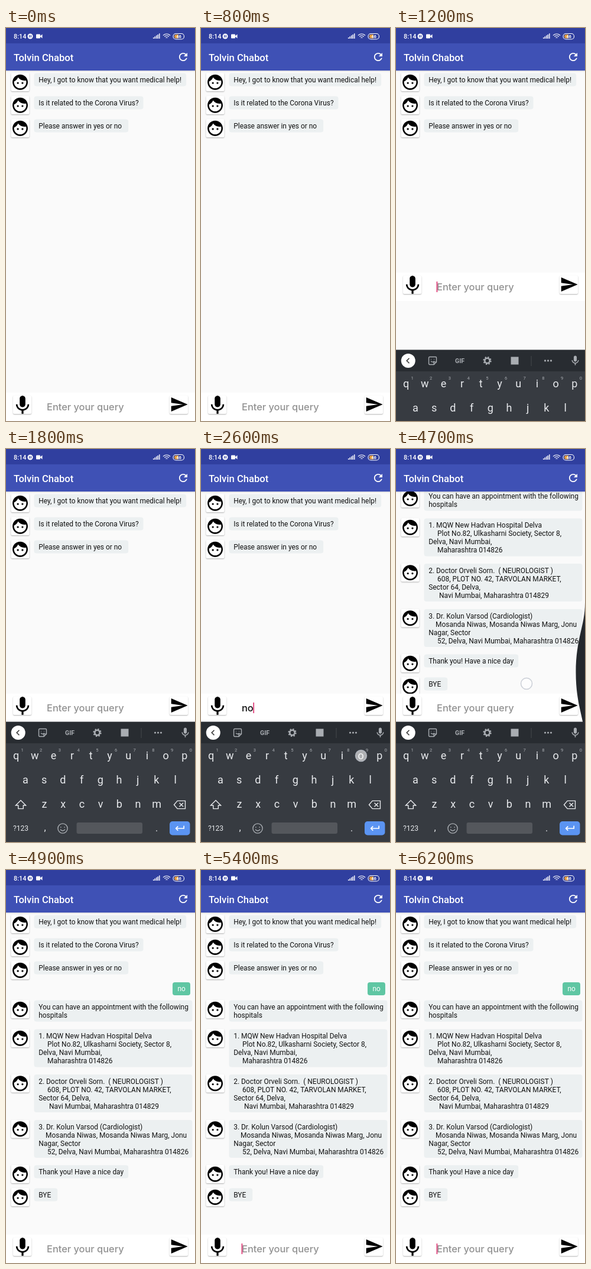
Animation, 320 px wide and 665 px high, one loop 6.3 s. Source, as an HTML page with a canvas:

```html
<!DOCTYPE html>
<html lang="en">
<head>
<meta charset="utf-8">
<title>Chat bot</title>
<style>
  html, body { margin: 0; width: 320px; height: 665px; overflow: hidden; background: #fafafa; }
  canvas { display: block; width: 320px; height: 665px; }
</style>
</head>
<body>
<canvas id="stage"></canvas>
<script>
const LOOP = 6300, W = 320, H = 665, LINE = 14;
const KEYS_UP = 1100, TYPE_N = 2300, TYPE_O = 2550, SENT = 3150, REPLY = 3850, KEYS_DOWN = 4760;
const ROBOTO = 'Roboto, sans-serif';

const canvas = document.getElementById('stage');
const scale = window.devicePixelRatio || 1;
canvas.width = W * scale;
canvas.height = H * scale;
const ctx = canvas.getContext('2d');

const ICONS = {
  face: 'M9 11.75c-.69 0-1.25.56-1.25 1.25s.56 1.25 1.25 1.25 1.25-.56 1.25-1.25-.56-1.25-1.25-1.25zm6 0c-.69 0-1.25.56-1.25 1.25s.56 1.25 1.25 1.25 1.25-.56 1.25-1.25-.56-1.25-1.25-1.25zM12 2C6.48 2 2 6.48 2 12s4.48 10 10 10 10-4.48 10-10S17.52 2 12 2zm0 18c-4.41 0-8-3.59-8-8 0-.29.02-.58.05-.86 2.36-1.05 4.23-2.98 5.21-5.37C11.07 8.33 14.05 10 17.42 10c.78 0 1.53-.09 2.25-.26.21.71.33 1.47.33 2.26 0 4.41-3.59 8-8 8z',
  mic: 'M12 14c1.66 0 3-1.34 3-3V5c0-1.66-1.34-3-3-3S9 3.34 9 5v6c0 1.66 1.34 3 3 3zm5.3-3c0 3-2.54 5.1-5.3 5.1S6.7 14 6.7 11H5c0 3.41 2.72 6.23 6 6.72V21h2v-3.28c3.28-.48 6-3.3 6-6.72z',
  send: 'M2 21L23 12 2 3v7l15 2-15 2z',
  refresh: 'M17.65 6.35C16.2 4.9 14.21 4 12 4c-4.42 0-8 3.58-8 8s3.58 8 8 8c3.73 0 6.84-2.55 7.73-6h-2.08c-.82 2.33-3.04 4-5.65 4-3.31 0-6-2.69-6-6s2.69-6 6-6c1.66 0 3.14.69 4.22 1.78L13 11h7V4z',
  shift: 'M12 4L3 13h4.5v6h9v-6H21z',
  erase: 'M8 5h14v14H8L2 12zM11.5 8.5l7 7m0-7l-7 7',
  enter: 'M20 7v5H5m4-4l-4 4 4 4',
  back: 'M14 7l-5 5 5 5',
  sticker: 'M5 3h14a2 2 0 0 1 2 2v10l-6 6H5a2 2 0 0 1-2-2V5a2 2 0 0 1 2-2zM21 15h-6v6M8 9h1m6 0h1M8 13q4 4 8 0',
  smile: 'M21 12a9 9 0 1 1-18 0a9 9 0 1 1 18 0zM8.5 9v1.5m7-1.5v1.5M7.5 14q4.5 5 9 0'
};
for (const name in ICONS) ICONS[name] = new Path2D(ICONS[name]);

// Each message: vertical middle of its first line, lines, full-width flag
const GREETING = [
  [88, ['Hey, I got to know that you want medical help!']],
  [127, ['Is it related to the Corona Virus?']],
  [166, ['Please answer in yes or no ']]
];
const ANSWER = [
  [232, ['You can have an appointment with the following', 'hospitals'], true],
  [281, ['1. MQW New Hadvan Hospital Delva', '     Plot No.82, Ulkasharni Society, Sector 8,',
    'Delva, Navi Mumbai,', '     Maharashtra 014826'], true],
  [357.5, ['2. Doctor Orveli Sorn.  ( NEUROLOGIST )', '     608, PLOT NO. 42, TARVOLAN MARKET,',
    'Sector 64, Delva,', '      Navi Mumbai, Maharashtra 014829'], true],
  [434.5, ['3. Dr. Kolun Varsod (Cardiologist)', '    Mosanda Niwas, Mosanda Niwas Marg, Jonu',
    'Nagar, Sector', '     52, Delva, Navi Mumbai, Maharashtra 014826'], true],
  [511, ['Thank you! Have a nice day']],
  [550, ['BYE ']]
];
const TAPS = [[1020, 130, 641], [TYPE_N, 223, 601], [TYPE_O, 271, 519], [SENT - 50, 293, 434]];

const progress = (t, from, to) => Math.min(1, Math.max(0, (t - from) / (to - from)));
const easeOut = p => 1 - (1 - p) ** 2;

function rect(x, y, w, h, color, radius = 0) {
  ctx.fillStyle = color;
  ctx.beginPath();
  ctx.roundRect(x, y, w, h, radius);
  ctx.fill();
}

function circle(x, y, r, color) {
  rect(x - r, y - r, 2 * r, 2 * r, color, r);
}

function text(string, x, y, size, color, { align = 'left', weight = 400, family = ROBOTO } = {}) {
  ctx.font = `${weight} ${size}px ${family}`;
  ctx.textAlign = align;
  ctx.fillStyle = color;
  ctx.fillText(string, x, y);
}

function icon(name, x, y, size, color, lineWidth) {
  ctx.save();
  ctx.translate(x, y);
  ctx.scale(size, size);
  ctx.translate(-12, -12);
  ctx.fillStyle = ctx.strokeStyle = color;
  if (lineWidth) {
    ctx.lineWidth = lineWidth / size;
    ctx.stroke(ICONS[name]);
  } else ctx.fill(ICONS[name]);
  ctx.restore();
}

function card(x, y) {
  ctx.save();
  ctx.shadowColor = 'rgba(0,0,0,.3)';
  ctx.shadowBlur = 2 * scale;
  ctx.shadowOffsetY = scale;
  rect(x, y, 31, 31, '#fff', 2);
  ctx.restore();
}

function message([y, lines, wide]) {
  card(8.5, y - 12);
  icon('face', 24, y + 3.7, 1.3, '#000');
  ctx.font = `11.95px ${ROBOTO}`;
  const width = wide ? 268 : ctx.measureText(lines[0]).width + 15.7;
  rect(47.5, y - 11.5, width, 22 + (lines.length - 1) * LINE, '#ecf0f1', 4);
  lines.forEach((line, i) => text(line, 55.2, y + 4 + i * LINE, 11.95, '#111'));
}

function chat(t, bottom) {
  ctx.save();
  ctx.beginPath();
  ctx.rect(0, 72, W, bottom - 72);
  ctx.clip();
  if (t >= REPLY && t < KEYS_DOWN) ctx.translate(0, -152 * easeOut(progress(t, REPLY, REPLY + 300)));
  GREETING.forEach(message);
  if (t >= SENT) {
    rect(282, 190, 30, 22, '#5fc6a3', 4);
    text('no', 290.4, 205, 11.95, '#fff');
  }
  if (t >= REPLY) ANSWER.forEach(message);
  ctx.restore();
}

function inputBar(t, top) {
  rect(0, top, W, 48, '#fff');
  card(12, top + 5);
  card(277, top + 5);
  icon('mic', 28, top + 21.3, 1.6, '#000');
  icon('send', 293, top + 20, 1.33, '#000');
  const typed = t >= TYPE_N && t < SENT ? (t < TYPE_O ? 'n' : 'no') : '';
  const style = { family: 'Inter, sans-serif', weight: 500 };
  text(typed || 'Enter your query', 69, top + 30, 16.4, typed ? '#111' : '#929292', style);
  const lastEdit = [SENT, TYPE_O, TYPE_N, KEYS_UP].find(edit => t >= edit);
  if (lastEdit && (t - lastEdit) % 1000 < 500) {
    rect(68.5 + (typed && ctx.measureText(typed).width), top + 15, 1.8, 18, '#e0407b');
  }
}

function header() {
  rect(0, 72, W, 2, 'rgba(0,0,0,.08)');
  rect(0, 0, W, 26, '#303f9f');
  rect(0, 26, W, 46, '#3f51b5');
  text('Tolvin Chabot', 13, 55.5, 16.6, '#fff', { weight: 500 });
  icon('refresh', 300, 49, 0.88, '#fff');

  text('8:14', 13, 18, 10.8, '#fff', { weight: 500 });
  circle(41, 14, 4.5, '#fff');
  rect(39, 12, 1.3, 4, '#303f9f');
  rect(41.7, 12, 1.3, 4, '#303f9f');
  rect(51, 10.5, 7, 7, '#fff', 1);
  ctx.beginPath();
  ctx.moveTo(57.5, 14);
  ctx.lineTo(61.5, 10.5);
  ctx.lineTo(61.5, 17.5);
  ctx.fill();

  for (let i = 0; i < 5; i++) rect(249 + i * 2.5, 16 - i * 1.7, 1.5, 2 + i * 1.7, '#fff');
  ctx.strokeStyle = '#fff';
  ctx.lineWidth = 1.1;
  for (const r of [2, 5, 8]) {
    ctx.beginPath();
    ctx.arc(272, 18, r, -Math.PI * 0.77, -Math.PI * 0.23);
    ctx.stroke();
  }
  rect(285, 11, 7, 6.5, '#e39a3c', [3, 0, 0, 3]);
  ctx.beginPath();
  ctx.roundRect(283, 9.5, 18.5, 9.5, 4.5);
  ctx.stroke();
  text('46', 292.5, 17, 7.5, '#fff', { align: 'center', weight: 700 });
}

function gear(x, y, color) {
  ctx.strokeStyle = color;
  for (const [r, width, dash] of [[4.2, 2.6, []], [6, 2.2, [Math.PI * 0.75]]]) {
    ctx.beginPath();
    ctx.setLineDash(dash);
    ctx.lineWidth = width;
    ctx.arc(x, y, r, 0, 2 * Math.PI);
    ctx.stroke();
  }
  ctx.setLineDash([]);
}

function keyboard(top) {
  const gray = '#a9adb2', light = '#e8eaed', center = { align: 'center' };
  ctx.save();
  ctx.translate(0, top);
  rect(0, 0, W, 203, '#373b41');
  rect(0, -0.5, W, 36.5, '#282c31');

  circle(20.7, 18, 12, '#fff');
  icon('back', 20.7, 18, 0.85, '#333', 1.6);
  icon('sticker', 62, 18, 0.72, gray, 1.4);
  text('GIF', 108, 21.7, 10.5, gray, { align: 'center', weight: 700 });
  gear(154.5, 18, gray);
  rect(194.5, 11.5, 13, 13, gray);
  rect(228.5, 10, 1, 17, '#44484d');
  for (const x of [252.5, 257.5, 262.5]) circle(x, 18, 1.6, gray);
  icon('mic', 303.5, 18, 0.85, gray);

  const row = (letters, x, y) => [...letters].forEach(
    (letter, i) => text(letter, x + i * 31.7, y, 18, light, center));
  row('qwertyuiop', 17, 63);
  row('asdfghjkl', 33, 104);
  row('zxcvbnm', 65, 145);
  for (let i = 0; i < 10; i++) text((i + 1) % 10, 27.5 + i * 31.7, 50, 7.5, gray, center);

  icon('shift', 25, 140, 0.95, light, 1.4);
  icon('erase', 294, 140, 0.95, light, 1.4);
  text('?123', 25, 184, 12, light, center);
  text(',', 66, 184, 16, light, center);
  icon('smile', 96, 180, 0.9, gray, 1.4);
  rect(119.5, 170, 111.5, 19, '#54575c', 3);
  text('.', 255, 185, 16, light, center);
  rect(277, 168, 34.5, 23.5, '#5b94f2', 5);
  icon('enter', 294, 180, 0.9, '#fff', 1.7);
  ctx.restore();
}

function touch(x, y) {
  circle(x, y, 9.5, 'rgba(255,255,255,.6)');
  ctx.strokeStyle = 'rgba(190,195,205,.8)';
  ctx.lineWidth = 1.5;
  ctx.beginPath();
  ctx.arc(x, y, 9.5, 0, 2 * Math.PI);
  ctx.stroke();
}

function backSwipe(t) {
  const bulge = 15.5 * easeOut(progress(t, 4480, 4680)) * (1 - progress(t, KEYS_DOWN, 4860));
  if (bulge) {
    const y = 378, x = W - bulge;
    ctx.fillStyle = '#24282c';
    ctx.beginPath();
    ctx.moveTo(W, y - 118);
    ctx.bezierCurveTo(W, y - 78, x, y - 58, x, y);
    ctx.bezierCurveTo(x, y + 58, W, y + 78, W, y + 118);
    ctx.fill();
  }
  if (t >= 4480 && t < KEYS_DOWN) {
    const p = easeOut(progress(t, 4480, 4700));
    touch(316 - 95 * p, 378 + 19 * p);
  }
}

function draw(t) {
  const open = t >= KEYS_UP && t < KEYS_DOWN;
  const barTop = open ? 414 : 617;
  ctx.setTransform(scale, 0, 0, scale, 0, 0);
  rect(0, 0, W, H, '#fafafa');
  chat(t, barTop);
  inputBar(t, barTop);
  header();
  backSwipe(t);
  const raised = easeOut(progress(t, KEYS_UP, KEYS_UP + 280)) - progress(t, KEYS_DOWN, 4900) ** 2;
  if (raised > 0) keyboard(H - 203 * raised);
  for (const [start, x, y] of TAPS) if (t >= start && t < start + 90) touch(x, y);
}

const start = performance.now();
function tick() {
  draw((performance.now() - start) % LOOP);
  requestAnimationFrame(tick);
}
tick();
</script>
</body>
</html>
```
